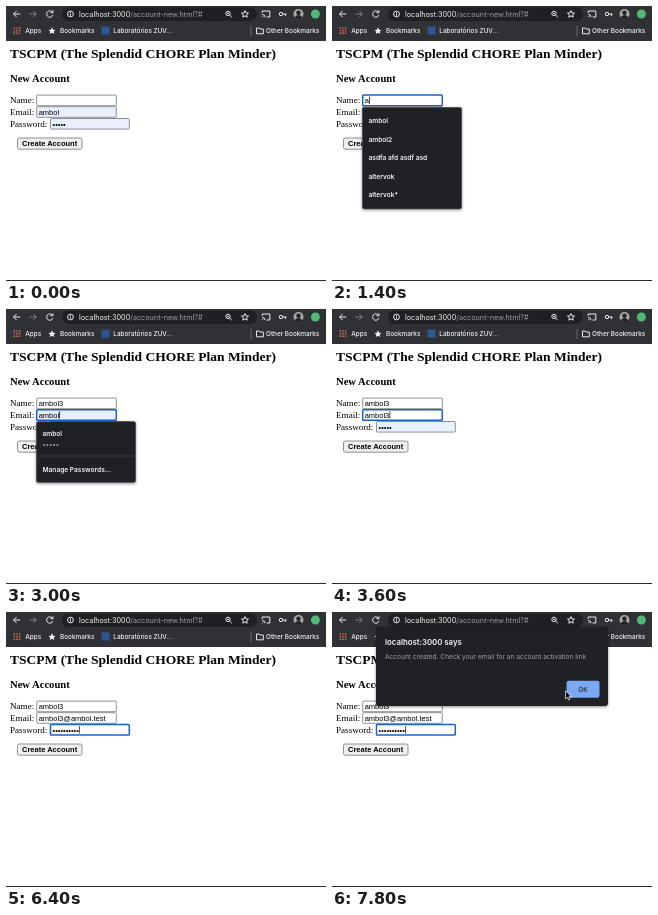
Recreate the animation shown at these times as an HTML page. Size 320 by 275 pixels, loop 8 s.

```html
<!DOCTYPE html>
<html lang="en">
<head>
<meta charset="utf-8">
<title>New Account</title>
<style>
  html, body { margin: 0; width: 100%; height: 100%; overflow: hidden; background: #fff; }
  svg { display: block; width: 100vw; height: 100vh; }
  text { white-space: pre; }
  .ui { font-family: Inter, Roboto, sans-serif; font-size: 6.4px; fill: #f1f3f4; }
  .marks { font-weight: 500; }
  .url { font-size: 7.25px; }
  .page { font-family: "Liberation Serif", serif; font-size: 9.1px; }
  .field { font-family: "Liberation Sans", sans-serif; font-size: 7.5px; }
  .bold { font-weight: 700; }
  .dim { fill: #9aa0a6; }
  .list text { font-size: 6.6px; font-weight: 600; }
  .box { fill: #fff; stroke: #767676; stroke-width: .8; }
  .box.auto { fill: #e8f0fe; }
  .box.focus { stroke: #1b62c4; stroke-width: 1.5; }
  .line { fill: none; stroke: #e8eaed; stroke-width: 1; }
  .pop { fill: #202124; stroke: #55585c; stroke-width: .5; }
  .soft { filter: drop-shadow(0 1px 1.5px rgba(0, 0, 0, .45)); }
</style>
</head>
<body>
<svg viewBox="0 0 320 275" preserveAspectRatio="none">
  <rect width="320" height="275" fill="#fff"/>

  <g class="ui">
    <rect width="320" height="35" fill="#303135"/>
    <rect x="56" y="1.5" width="195" height="13.5" rx="6.7" fill="#1f2023"/>
    <path class="line" d="M14.2 8H7.5M10.6 4.9L7.5 8L10.6 11.1"/>
    <path class="line" stroke-opacity=".4" d="M23.5 8H30.2M27.1 4.9L30.2 8L27.1 11.1"/>
    <path class="line" d="M46.3 6A3.2 3.2 0 1 0 46.9 9M47 4.3V6.7H44.5"/>
    <circle class="line" cx="64.5" cy="8" r="2.9" stroke-width=".8"/>
    <path class="line" stroke-width=".9" d="M64.5 7.5V9.7M64.5 6V6.8"/>
    <text class="url" x="73" y="10.6">localhost:3000<tspan class="dim">/account-new.html?#</tspan></text>
    <circle class="line" cx="222" cy="7.4" r="2.2" stroke-width=".8"/>
    <path class="line" stroke-width=".8" d="M223.6 9L225.8 11.2M221 7.4H223"/>
    <path class="line" stroke-width=".8" d="M239 4.6L240 6.9L242.5 7.1L240.6 8.7L241.2 11.2L239 9.9L236.8 11.2L237.4 8.7L235.5 7.1L238 6.9Z"/>
    <path class="line" stroke-width=".9" d="M256.2 7V5H263.8V11H260.6M256.2 8.4A2.8 2.8 0 0 1 259 11.2M256.2 10.3A1 1 0 0 1 257.1 11.2"/>
    <circle class="line" cx="275" cy="8" r="1.7" stroke-width="1.2"/>
    <path class="line" stroke-width="1.2" d="M276.8 8H280.5M279.4 8V10"/>
    <circle cx="292.5" cy="8" r="5" fill="#a9a9a9"/>
    <path d="M288.6 11.2Q292.5 6.6 296.4 11.2A5 5 0 0 1 288.6 11.2Z" fill="#222"/>
    <circle cx="292.5" cy="6.7" r="2.2" fill="#222"/>
    <circle cx="309.4" cy="8" r="4.5" fill="#52b878"/>

    <g class="marks">
      <g id="apps"></g>
      <text x="19.3" y="27">Apps</text>
      <path d="M46 21.2L47.1 23.7L49.6 23.9L47.7 25.6L48.3 28.1L46 26.8L43.7 28.1L44.3 25.6L42.4 23.9L44.9 23.7Z"/>
      <text x="54" y="27">Bookmarks</text>
      <rect x="95.5" y="20.5" width="8" height="8" fill="#2c5594"/>
      <text x="107.3" y="27">Laboratórios ZUV...</text>
      <path class="line" stroke-opacity=".3" stroke-width=".6" d="M245 20V30"/>
      <path class="line" d="M250.5 22H253L254 23H257.3V27.8H250.5Z"/>
      <text x="260" y="27">Other Bookmarks</text>
    </g>
  </g>

  <g class="page">
    <text class="bold" x="4" y="51.8" font-size="13.5">TSCPM (The Splendid CHORE Plan Minder)</text>
    <text class="bold" x="4" y="76" font-size="10.6">New Account</text>
    <text x="4" y="97.3">Name:</text>
    <text x="4" y="108.9">Email:</text>
    <text x="4" y="120.6">Password:</text>
  </g>

  <g id="fields" class="field"></g>

  <rect x="11.5" y="132" width="64.5" height="11.2" rx="1.8" fill="#efefef" stroke="#767676" stroke-width=".8"/>
  <text class="field bold" x="16" y="140.3">Create Account</text>
  <rect y="274" width="320" height="1" fill="#2b2d2b"/>

  <g id="names" class="ui list">
    <rect id="namesBox" class="pop soft" x="30.3" y="101.3" width="99.4" rx="2"/>
  </g>

  <g id="logins" class="ui list">
    <rect class="pop soft" x="30.3" y="112.6" width="99.4" height="61" rx="2"/>
    <text x="36.5" y="127">ambol</text>
    <text class="dim" x="36.5" y="137.5">•••••</text>
    <path d="M30.5 147H129.5" stroke="#4a4c50" stroke-width=".6"/>
    <text x="36.5" y="163">Manage Passwords...</text>
  </g>

  <g id="alert" class="ui">
    <rect class="soft" x="44" y="15" width="232" height="79" rx="3" fill="#202124"/>
    <text x="53" y="32.6" font-weight="600" style="font-size:7.8px">localhost:3000 says</text>
    <text class="dim" x="53" y="47" style="font-size:6.6px">Account created. Check your email for an account activation link</text>
    <rect x="234.5" y="68.8" width="33" height="17" rx="2.2" fill="#7ba7f3"/>
    <text x="251" y="79.6" text-anchor="middle" style="fill:#202124;font-weight:500">OK</text>
  </g>

  <path id="mouse" d="M0 0V8L1.9 6.4L3.1 9.2L4.5 8.6L3.3 5.9H5.8Z" fill="#000" stroke="#fff" stroke-width=".7"/>
</svg>

<script>
const LOOP = 8000;
const $ = id => document.getElementById(id);

function add(parent, tag, attrs, text = '') {
  const el = document.createElementNS('http://www.w3.org/2000/svg', tag);
  for (const key in attrs) el.setAttribute(key, attrs[key]);
  el.textContent = text;
  return parent.appendChild(el);
}

const dotColors = ['#e8685c', '#d0567a', '#b98a4a'];
for (let i = 0; i < 9; i++) {
  const col = i % 3, row = Math.floor(i / 3);
  add($('apps'), 'rect', {
    x: 7.6 + col * 2.6, y: 21.3 + row * 2.6,
    width: 1.5, height: 1.5, fill: dotColors[(col + row) % 3]
  });
}

const suggestions = ['ambol', 'ambol2', 'asdfa afd asdf asd', 'altervok', 'altervok*'];
const rows = suggestions.map((s, i) =>
  add($('names'), 'text', { x: 36.5, y: 117.3 + 18.5 * i }, s));

function makeField(x, y, w) {
  const g = $('fields'), h = 10.6;
  return {
    x: x + 2,
    box: add(g, 'rect', { x, y, width: w, height: h, rx: .8 }),
    mark: add(g, 'rect', { x: x + 1.8, y: y + 1.6, height: h - 3, fill: '#a8cdf8' }),
    text: add(g, 'text', { x: x + 2, y: y + 8.2 }),
    caret: add(g, 'rect', { y: y + 1.7, width: .7, height: h - 3.4, fill: '#000' })
  };
}

const fields = {
  name: makeField(30.7, 89.1, 79.6),
  email: makeField(30.7, 100.7, 79.6),
  pass: makeField(44.5, 112.5, 78.8)
};

const start = {
  name: '', email: 'ambol', pass: 5, focus: '', emailAuto: true, passAuto: true,
  selected: false, names: 0, logins: false, alert: false, mouse: null
};

// Each entry changes part of the state at its time in ms.
const steps = [
  [600, { focus: 'name' }],
  [1200, { name: 'a', names: 5 }],
  [1600, { name: 'am', names: 2 }],
  [1800, { name: 'ambo' }],
  [2000, { name: 'ambol' }],
  [2400, { name: 'ambol3', names: 0 }],
  [2600, { focus: 'email' }],
  [2800, { logins: true }],
  [3600, { email: 'ambol3', emailAuto: false, logins: false }],
  [4000, { email: 'ambol3@' }],
  [4200, { email: 'ambol3@a' }],
  [4400, { email: 'ambol3@amb' }],
  [4600, { email: 'ambol3@ambol' }],
  [4800, { email: 'ambol3@ambol.t' }],
  [5000, { email: 'ambol3@ambol.test' }],
  [5200, { focus: 'pass', selected: true }],
  [5400, { pass: 1, passAuto: false, selected: false }],
  [5600, { pass: 3 }],
  [5800, { pass: 5 }],
  [6000, { pass: 7 }],
  [6200, { pass: 9 }],
  [6400, { pass: 10 }],
  [6800, { alert: true }],
  [7400, { mouse: [182, 85] }],
  [7600, { mouse: [210, 82] }],
  [7800, { mouse: [233.5, 78.8] }]
];

const show = (el, on) => el.setAttribute('visibility', on ? 'visible' : 'hidden');

function drawField(id, value, auto, s) {
  const f = fields[id], focused = s.focus === id;
  const selected = focused && s.selected;
  f.text.textContent = value;
  f.box.setAttribute('class', 'box' + (auto ? ' auto' : '') + (focused ? ' focus' : ''));
  const width = value ? f.text.getComputedTextLength() : 0;
  f.caret.setAttribute('x', f.x + width + .2);
  f.mark.setAttribute('width', width + .4);
  show(f.caret, focused && !selected);
  show(f.mark, selected);
}

function draw(s) {
  drawField('name', s.name, false, s);
  drawField('email', s.email, s.emailAuto, s);
  drawField('pass', '•'.repeat(s.pass), s.passAuto, s);
  show($('names'), s.names);
  $('namesBox').setAttribute('height', 27.6 + 18.5 * Math.max(0, s.names - 1));
  rows.forEach((row, i) => show(row, i < s.names));
  show($('logins'), s.logins);
  show($('alert'), s.alert);
  show($('mouse'), s.mouse);
  if (s.mouse) $('mouse').setAttribute('transform', `translate(${s.mouse})`);
}

const t0 = performance.now();
let drawn = -1;

function tick(now) {
  const t = Math.max(0, now - t0) % LOOP;
  const done = steps.filter(([at]) => at <= t);
  if (done.length !== drawn) {
    drawn = done.length;
    draw(Object.assign({}, start, ...done.map(([, change]) => change)));
  }
  requestAnimationFrame(tick);
}
tick(t0);
</script>
</body>
</html>
```
